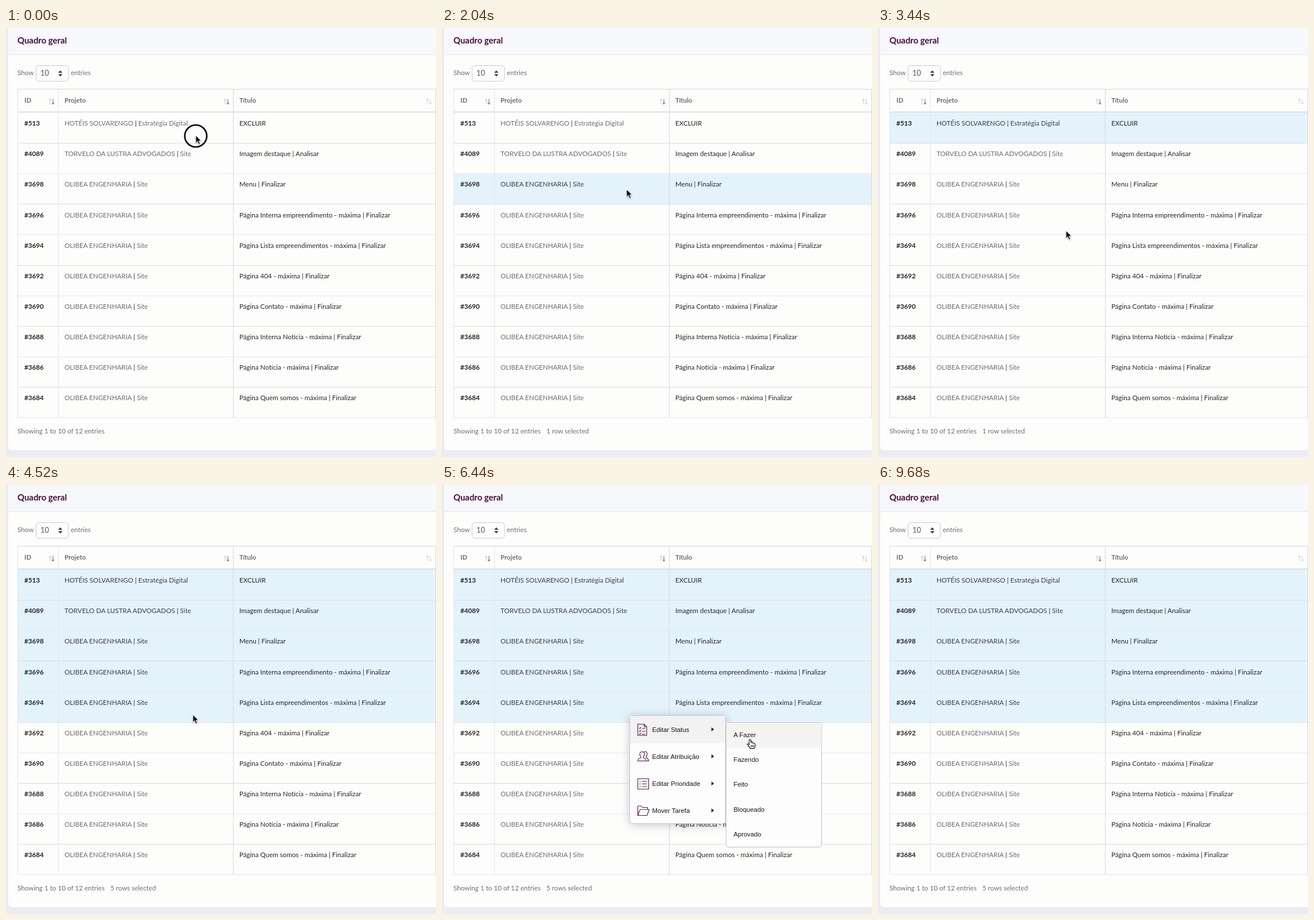
An HTML page that plays this animation: 750x747 px, repeating every 9.72 s.

```html
<!DOCTYPE html>
<html lang="pt">
<head>
<meta charset="utf-8">
<title>Quadro geral</title>
<style>
html, body { margin: 0; width: 100%; height: 100%; overflow: hidden; background: #ebecf4; }
svg { display: block; width: 100%; height: 100%; font: 11.6px Lato, sans-serif; font-variant-ligatures: none; fill: #6c6d73; }
.bold { font-weight: 700; }
.dark { fill: #252528; }
.menu { font: 11.3px "Liberation Sans", Arial, sans-serif; fill: #161616; }
.panel { fill: #fdfdfd; stroke: #c9c9cf; filter: drop-shadow(0 2px 8px rgba(60, 60, 90, .28)); }
.sub { fill: #fdfdfd; stroke: #bdbdc4; }
.icon { fill: none; stroke: #56154c; stroke-width: 1.1; stroke-linejoin: round; }
.arrow { fill: #3f0735; }
</style>
</head>
<body>
<svg id="stage" viewBox="0 0 750 747"></svg>
<script>
const LOOP = 9720, ROW_TOP = 147, ROW_H = 53.1;
const stage = document.getElementById('stage');

function el(tag, attrs, parent = stage, content) {
  const node = document.createElementNS('http://www.w3.org/2000/svg', tag);
  for (const key in attrs) node.setAttribute(key, attrs[key]);
  if (content !== undefined) node.textContent = content;
  return parent.appendChild(node);
}
const box = (x, y, width, height, fill, parent) => el('rect', { x, y, width, height, fill }, parent);
const label = (x, y, content, attrs, parent) => el('text', { x, y, ...attrs }, parent, content);
const show = (node, on) => { node.style.display = on ? '' : 'none'; };

// Card
el('rect', { x: 3, y: -10, width: 770, height: 746, rx: 6, fill: '#fdfdfc', stroke: '#e1e3ee' });
box(3.5, 0, 747, 46, '#f7f8fc');
box(3, 46, 747, 1, '#e3e6f3');
label(20, 27, 'Quadro geral', { class: 'bold', fill: '#470a3c', 'font-size': 14.9 });

// Length selector
label(20, 82, 'Show');
label(113, 82, 'entries');
el('rect', { x: 52.5, y: 65.5, width: 56.5, height: 27, rx: 4.5, fill: '#fefefe', stroke: '#c8cad6' });
label(60, 83, '10', { 'font-size': 13, fill: '#55565e' });
el('path', { d: 'M91 78l3.7-4.3 3.7 4.3zM91 80.3l3.7 4.3 3.7-4.3z', fill: '#3c3d46' });

// Table
const projects = [['HOTÉIS SOLVARENGO', 'Estratégia Digital'], ['TORVELO DA LUSTRA ADVOGADOS', 'Site']];
const titles = [
  'EXCLUIR', 'Imagem destaque | Analisar', 'Menu | Finalizar',
  'Página Interna empreendimento - máxima | Finalizar',
  'Página Lista empreendimentos - máxima | Finalizar',
  'Página 404 - máxima | Finalizar', 'Página Contato - máxima | Finalizar',
  'Página Interna Notícia - máxima | Finalizar', 'Página Notícia - máxima | Finalizar',
  'Página Quem somos - máxima | Finalizar'
];
const rows = titles.map((title, i) => {
  const y = ROW_TOP + ROW_H * i, base = y + 23.2;
  const fill = box(21, y, 729, ROW_H, '#e4f2fb');
  const id = i === 0 ? 513 : i === 1 ? 4089 : 3702 - 2 * i;
  label(32, base, '#' + id, { class: 'bold dark', 'font-size': 11.7 });
  const [client, kind] = projects[i] || ['OLIBEA ENGENHARIA', 'Site'];
  const project = label(102, base, client + ' ');
  el('tspan', { class: 'dark' }, project, '|');
  el('tspan', {}, project, ' ' + kind);
  return { fill, project, title: label(407, base, title, { class: 'dark' }) };
});

box(20, 106, 730, 1, '#d6d6da');
box(20, 145.5, 730, 1.7, '#dadade');
for (let i = 1; i <= 10; i++)
  box(20, Math.round(ROW_TOP + ROW_H * i), 730, 1, i % 2 ? '#dadbdc' : '#e4e7f0');
[[20, '#e2e4ee'], [91, '#e2e4ee'], [396, '#d8d8dc'], [749, '#d8d8dc']]
  .forEach(([x, color]) => box(x, 106, 1, 573, color));

[['ID', 32, 77, '#77777d'], ['Projeto', 102, 382, '#77777d'], ['Título', 407, 735, '#d3d3d8']]
  .forEach(([name, x, sx, color]) => {
    label(x, 130, name, { class: 'bold', 'font-size': 11.4 });
    const line = (d, stroke) => el('path', { d, stroke, fill: 'none', 'stroke-width': 1.1 });
    line(`M${sx} 132.5v-9m-2 2.5l2-2.5 2 2.5`, '#d0d0d5');
    line(`M${sx + 5} 123.5v9m-2-2.5l2 2.5 2-2.5`, color);
  });

label(20, 706, 'Showing 1 to 10 of 12 entries', { 'font-size': 11.7 });
const count = label(182, 706, '');

// Context menu
const menu = el('g', { class: 'menu' });
el('rect', { class: 'panel', x: 327.5, y: 401.5, width: 167, height: 188, rx: 4 }, menu);
const menuHover = box(328, 402, 166, 47.5, '#f2f2f2', menu);
const icons = [
  'M341.5 416.5h11l4.5 4.5v15h-15.5zM352.5 416.5v4.5h4.5M344 423l1.2 1.2 2-2.5M344 428l1.2 1.2 2-2.5M344 433l1.2 1.2 2-2.5M349 424h5.5M349 429h5.5M349 434h5.5',
  'M341.5 480.5q0-4 4.5-5 1.5-.7.5-2.5-2-2-1.5-5 .7-3.5 4-3.5t4 3.5q.5 3-1.5 5-1 1.8.5 2.5 4.5 1 4.5 5zM352 465q3-1.8 5 .5 2 3-.8 7-.8 2 1 2.7 3 1.5 3.3 5.3h-4',
  'M341.5 511.5h19v18h-19zM344.5 516h2M344.5 520.5h2M344.5 525h2M349 516h8.5M349 520.5h8.5M349 525h8.5',
  'M341.5 575.5v-16.5h6l2 2.5h9v3.5M341.5 575.5l4-10.5h16l-4 10.5z'
];
['Editar Status', 'Editar Atribuição', 'Editar Prioridade', 'Mover Tarefa'].forEach((name, i) => {
  const y = 429.5 + 47.1 * i;
  el('path', { class: 'icon', d: icons[i] }, menu);
  label(366.5, y, name, {}, menu);
  el('path', { class: 'arrow', d: `M470 ${y - 7.5}l4.5 3.5-4.5 3.5z` }, menu);
});

const sub = el('g', { class: 'menu' });
el('rect', { class: 'sub', x: 495.5, y: 413.5, width: 166.5, height: 217, rx: 4 }, sub);
const subHover = box(496, 414, 165.5, 43.5, '#f4f4f3', sub);
['A Fazer', 'Fazendo', 'Feito', 'Bloqueado', 'Aprovado']
  .forEach((name, i) => label(508.5, 439 + 43.2 * i, name, {}, sub));

// Pointer
const ring = el('circle', { r: 19.2, fill: 'none', stroke: '#0c0c14', 'stroke-width': 2.8 });
const pointer = el('g', { style: 'filter:drop-shadow(0 1px 1px rgba(0,0,0,.35))' });
const arrow = el('path', {
  d: 'M0 0v13.2l3-2.8 2.2 5 2.4-1-2.2-4.9h4.1z',
  fill: '#0a0a0a', stroke: '#fff', 'stroke-width': .9
}, pointer);
const hand = el('path', {
  d: 'M-1.7 9V1.2Q-1.7-.4-.2-.4T1.3 1.2V5.5Q3-.1 3.9 5.9 5.6 4.6 6.3 6.4 8.5 5.7 8.5 8v3.2L7 14.8H.4L-2.3 11.5-4.7 8.3Q-4.8 6.3-3 7.4zM1.6 9.5v3M3.7 9.5v3M5.8 9.5v3',
  fill: '#fff', stroke: '#2b2b33', 'stroke-width': 1.2, 'stroke-linejoin': 'round'
}, pointer);

// Timeline
const path = [
  [0, 331, 187], [360, 331, 187], [760, 326, 237], [1080, 326, 237], [1480, 322, 281],
  [2120, 322, 281], [2600, 331, 182], [3000, 331, 182], [3440, 328, 353], [3760, 326, 400],
  [4880, 326, 400], [5280, 390, 426], [5640, 484, 430], [6080, 537.5, 443.5], [6960, 537.5, 443.5],
  [7320, 538.5, 478.5], [8160, 538.5, 478.5], [8840, 775, 560], [LOOP, 775, 560]
];
const clicks = [0, 840, 1560, 2680, 4000, 4760, 7440];
// start, first row, number of rows
const picks = [[0, 0, 0], [80, 0, 1], [920, 1, 1], [1640, 2, 1], [2760, 0, 1], [4080, 0, 5]];

function place(t) {
  const i = path.findIndex(p => p[0] > t);
  const [t0, x0, y0] = path[i - 1], [t1, x1, y1] = path[i];
  const p = (t - t0) / (t1 - t0), k = p * p * (3 - 2 * p);
  return [x0 + (x1 - x0) * k, y0 + (y1 - y0) * k];
}

function draw(t) {
  const [x, y] = place(t);
  const [, first, size] = picks.filter(p => p[0] <= t).pop();
  rows.forEach((row, i) => {
    const on = i >= first && i < first + size;
    show(row.fill, on);
    row.project.setAttribute('fill', on ? '#3c3d43' : '#6c6d73');
  });
  count.textContent = size ? `${size} row${size > 1 ? 's' : ''} selected` : '';

  const open = t >= 4840 && t < 7520;
  show(menu, open);
  show(menuHover, t >= 5000);
  show(sub, open && t >= 5160);
  show(subHover, x > 495);
  subHover.setAttribute('y', y > 457 ? 457.5 : 414);

  const onLink = t >= 7520 && x < 586 && y < 493;
  rows[6].title.setAttribute('text-decoration', onLink ? 'underline' : 'none');
  const pointing = open && t >= 5000 || onLink;
  show(hand, pointing);
  show(arrow, !pointing);
  pointer.setAttribute('transform', `translate(${x} ${y})`);
  ring.setAttribute('cx', x);
  ring.setAttribute('cy', y + 1);
  show(ring, clicks.some(c => t >= c && t < c + 200));
}

const start = performance.now();
function tick() {
  draw((performance.now() - start) % LOOP);
  requestAnimationFrame(tick);
}
tick();
</script>
</body>
</html>
```
